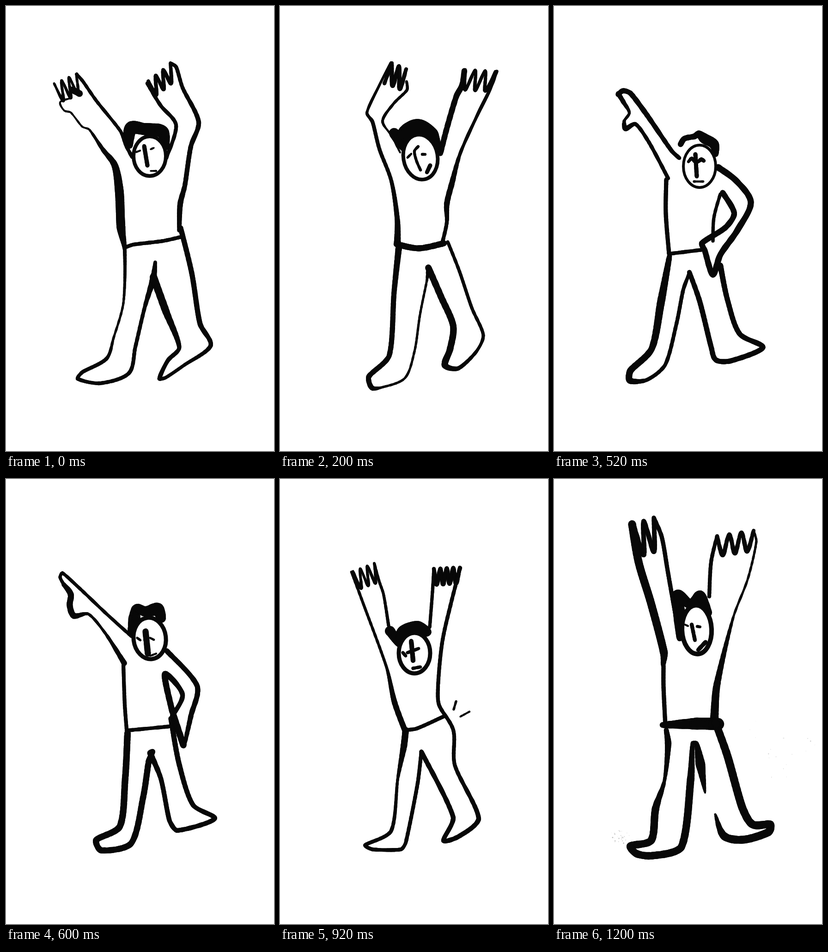
An HTML page with a canvas that plays this animation: 580x966 px, repeating every 1400 ms.

```html
<!DOCTYPE html>
<html lang="en">
<head>
<meta charset="utf-8">
<title>Brush dancer</title>
<style>
html, body { margin: 0; width: 100%; height: 100%; overflow: hidden; background: #fff; }
canvas { display: block; width: 580px; height: 966px; }
</style>
</head>
<body>
<canvas id="stage"></canvas>
<script>
const W = 580, H = 966, HOLD = 200, INK = "#080808";
const canvas = document.getElementById("stage");
const ctx = canvas.getContext("2d");
const scale = Math.max(1, window.devicePixelRatio || 1);
canvas.width = W * scale;
canvas.height = H * scale;
ctx.scale(scale, scale);

const mix = (a, b, t) => a + (b - a) * t;
const dist = (p, q) => Math.hypot(p[0] - q[0], p[1] - q[1]);

// Catmull-Rom blend of one coordinate
const blend = (a, b, c, d, t) => 0.5 * (2 * b + (c - a) * t
  + (2 * a - 5 * b + 4 * c - d) * t * t + (3 * b - a - 3 * c + d) * t * t * t);

// Pull a neighbour closer so long spans do not bend short ones.
function near(p, q, span) {
  const k = Math.min(1, span / (dist(p, q) || 1));
  return [mix(q[0], p[0], k), mix(q[1], p[1], k)];
}

// Pressure-sensitive brush line with a slightly rough edge
function sweep(pts) {
  const end = pts.length - 1;
  let [px, py] = pts[0];
  for (let i = 0; i < end; i++) {
    const b = pts[i], c = pts[i + 1], span = dist(b, c);
    const a = near(pts[Math.max(0, i - 1)], b, span);
    const d = near(pts[Math.min(end, i + 2)], c, span);
    const steps = Math.max(2, Math.ceil(span / 3));
    for (let s = 1; s <= steps; s++) {
      const t = s / steps;
      const x = blend(a[0], b[0], c[0], d[0], t);
      const y = blend(a[1], b[1], c[1], d[1], t);
      ctx.lineWidth = mix(b[2], c[2], t) + 0.5 * Math.sin(x * 1.7 + y * 0.9);
      ctx.beginPath();
      ctx.moveTo(px, py);
      ctx.lineTo(x, y);
      ctx.stroke();
      [px, py] = [x, y];
    }
  }
}

// Points are "x,y" or "x,y,width"; a missing width keeps the last one.
function line(width, text) {
  sweep(text.split(" ").map(item => {
    const [x, y, w] = item.split(",").map(Number);
    width = w || width;
    return [x, y, width];
  }));
}

// Fingers zigzag between tips on a line and valleys shifted by (dx, dy).
function fingers(n, ax, ay, bx, by, dx, dy, w) {
  const pts = [];
  for (let i = 0; i <= 2 * n - 2; i++) {
    const t = i / (2 * n - 2), low = i % 2;
    pts.push([mix(ax, bx, t) + low * dx, mix(ay, by, t) + low * dy, w - 1 + low * 2]);
  }
  sweep(pts);
}

function head(x, y, rx, ry, tilt, w) {
  ctx.beginPath();
  ctx.ellipse(x, y, rx, ry, tilt, 0, 7);
  ctx.lineWidth = w;
  ctx.fillStyle = "#fff";
  ctx.fill();
  ctx.stroke();
}

function dust(x, y, spread, count, seed) {
  const rnd = () => (seed = seed * 16807 % 2147483647) / 2147483647;
  for (let i = 0; i < count; i++) {
    ctx.fillStyle = `rgba(0,0,0,${0.06 + rnd() * 0.2})`;
    ctx.beginPath();
    ctx.arc(x + (rnd() + rnd() - 1) * spread, y + (rnd() + rnd() - 1) * spread, 0.5 + rnd(), 0, 7);
    ctx.fill();
  }
}

function reach() {
  line(18, "268,304,10 266,282,24 272,264,28 298,267,26 338,273,28 346,306,14");
  head(311, 326, 35, 43, 0, 8);
  line(9, "299,304 306,346");
  line(4, "282,317 290,314");
  line(4, "313,311 320,308");
  line(4, "313,358 325,358");
  fingers(4, 104, 168, 152, 148, 12, 41, 6);
  line(10, "153,148,7 166,163 195,205 248,272 260,303,8 273,328");
  line(9, "144,182,15 159,190,14");
  line(6, "140,200,4 117,209 126,227 140,231 165,262 180,268 210,312,9 235,345,14 245,400,19 249,482 257,530,8 254,645,5 233,720 218,765,8 165,795 155,809 203,819,8 266,797 280,740 300,655 319,590,14 323,556,7");
  line(11, "319,588,16 345,660 375,742,9 350,770 332,809 345,807,7 385,780 443,737,9 420,690,11 402,580 378,482");
  line(13, "258,524,8 275,518 340,510 380,501");
  fingers(4, 308, 163, 356, 126, 9, 36, 8);
  line(8, "356,124 368,132 382,177 417,252,10 400,305 387,390 377,430,12 375,487,9");
  line(8, "306,168 334,215 368,258 347,330");
}

function sway() {
  line(24, "247,276 266,310,8 268,278,28 298,266,42 326,280,34 338,305,18");
  head(304, 328, 37, 49, -0.16, 8);
  line(8, "299,305,6 291,315 295,335 304,356");
  line(5, "276,329 284,321");
  line(6, "308,322 314,322");
  line(9, "318,361 325,346");
  fingers(3, 242, 124, 273, 137, -6, 46, 9);
  line(12, "226,168,8 242,125");
  line(6, "240,123 215,172 188,232 200,251,8 215,310 241,380 254,465,11 254,516,15");
  line(8, "274,164,6 275,182 245,213 222,250 240,280,4 260,318");
  fingers(4, 401, 138, 466, 142, -11, 43, 7);
  line(6, "399,141,12 394,172,12 382,195 362,262 347,320");
  line(10, "469,142,7 455,180 428,235 390,320 372,385,12 361,430 361,470,8 350,519");
  line(9, "252,517,13 300,526 355,515");
  line(7, "257,525,14 247,620,11 236,760,11 192,805 199,829 220,828,5 270,808 291,750 303,670,5 318,595 321,570,10");
  line(11, "321,568,14 348,630 375,695 368,745 357,780 385,787,9 425,750,7 440,715 415,655 388,575 363,512");
}

function point() {
  line(18, "274,300,12 282,288 304,283 313,278,14 326,288,22 346,300,22 350,322,12");
  head(315, 348, 35, 46, 0, 6);
  line(9, "306,322 309,370");
  line(5, "291,338 298,331,8 304,337");
  line(6, "312,338 319,333,9 324,336");
  line(5, "303,381 323,381");
  line(11, "139,192 149,184 165,189 200,235 255,315,9 271,330");
  line(10, "139,190 150,208 163,232,6 152,250 155,266,12 176,256,8 205,295 247,374");
  line(14, "243,376,9 242,450 249,538");
  line(8, "249,538 322,529");
  line(11, "250,543 232,640,17 211,745,14 165,792 164,813 200,812,8 240,780 265,690 280,615 293,580");
  line(8, "293,578,10 315,640,11 340,740 350,768 380,771 452,741 402,712 376,640 360,563,12");
  line(10, "355,350,14 395,380,13 426,426 398,485 360,540 344,583 326,530,12 320,515 372,480 390,450 365,405");
  line(7, "360,408 346,460 344,510");
}

function jab() {
  line(18, "270,335,12 278,302,26 282,280,16 302,288,22 328,283,28 336,302,20");
  head(311, 346, 35, 45, -0.12, 9);
  line(13, "302,331 307,379");
  line(5, "284,345 291,350");
  line(5, "312,345 320,349");
  line(4, "312,384 325,379");
  line(11, "125,229,7 117,213 122,204 160,238 220,295 272,342");
  line(9, "125,229 140,250,13 138,275 147,297 178,293,6 215,335 256,400,12");
  line(12, "254,402,8 257,490 261,543");
  line(8, "261,546 355,537");
  line(9, "263,552,14 258,650 246,755 195,784,13 205,806 270,792 297,690 309,613 317,592,12 312,594");
  line(13, "312,595 335,650,10 354,742 370,763,10 452,737 405,708 375,620,11 357,520");
  line(11, "348,373 414,450 400,515 386,578,8");
  line(8, "362,512,14 384,578");
  line(10, "360,514 382,468 344,423,13 360,506");
}

function stretch() {
  line(20, "238,330,22 262,358,18 270,335,36 298,324,32 318,332,20");
  head(291, 378, 34, 44, 0, 9);
  line(10, "284,352 288,394");
  line(7, "266,377 272,384");
  line(7, "276,377 300,368");
  line(7, "288,411 304,408");
  fingers(4, 158, 200, 204, 183, 10, 40, 6);
  line(6, "155,202 180,270 231,410 248,485,12 270,545");
  line(6, "204,183 214,220 224,250 235,318,7");
  fingers(5, 333, 195, 389, 192, -1, 34, 9);
  line(7, "324,322 330,245 333,195");
  line(8, "390,193 370,270 351,355 342,450 344,490 375,545 378,620 430,738,10 385,777 354,785 375,735,10 306,592");
  line(8, "306,592 298,660 272,790 262,804 200,804 184,795 240,765 255,650,6 268,580,14 272,545");
  line(8, "270,545 295,542 353,516");
  line(5, "376,500 381,483");
  line(4, "390,516 410,505");
}

// Spiky fringe: short strokes rising from the hairline
function spikes(n, ax, ay, bx, by) {
  for (let i = 0; i < n; i++) {
    const x = mix(ax, bx, i / (n - 1)), y = mix(ay, by, i / (n - 1));
    line(7, `${x - 4},${y + 12} ${x},${y},3`);
  }
}

function lift() {
  spikes(5, 230, 325, 270, 322);
  line(20, "226,342 234,366,10 244,338 272,344 292,354");
  head(266, 390, 31, 47, -0.08, 7);
  line(6, "257,370 260,395 265,414 275,415");
  line(5, "240,383 260,375");
  line(7, "262,381 272,382");
  line(5, "275,425 284,421");
  fingers(4, 131, 209, 179, 204, 9, 36, 7);
  line(6, "129,212 152,268 180,335 212,432 225,490 218,555");
  line(7, "180,203 200,250 204,285 221,345");
  fingers(4, 289, 212, 348, 213, -4, 46, 7);
  line(6, "291,338 287,260 289,212");
  line(7, "349,212 335,290 325,340 317,430 319,562,9");
  line(9, "216,563 260,556 318,557");
  line(7, "214,563 211,580 236,632");
  line(8, "231,636,17 235,785,17 245,800 300,790 318,780 285,765,13 275,700 275,640 283,592");
  line(10, "283,588 342,675 375,766 400,766 467,724 412,740 375,670 319,562");
  line(3, "578,960 578,966");
}

function cheer() {
  line(18, "272,346,12 272,302,26 268,253,26 296,272,20 316,253,22 332,290,20");
  head(309, 327, 32, 53, -0.04, 10);
  line(9, "312,371 328,354");
  line(8, "298,316 305,350");
  line(4, "283,316 290,319");
  line(6, "310,320 316,321");
  fingers(3, 172, 98, 216, 84, 11, 70, 10);
  line(12, "169,98,17 183,180 210,270 238,378 236,405,9");
  line(9, "216,84 233,125 247,205 262,290 272,345");
  fingers(4, 353, 124, 432, 112, -1, 43, 9);
  line(8, "336,255 340,180 353,124");
  line(12, "432,112,5 438,135 420,215 388,300 352,450,15 347,520,18");
  line(15, "237,405,9 237,450 241,535");
  line(12, "235,534 311,531,26 355,532");
  line(10, "243,545 247,575,14 239,655,7 220,715,16 210,785 165,797 178,813 210,818 275,800 296,650 300,573,8 308,573 317,620,21 327,681,4");
  line(12, "349,728,4 368,775,17 410,783 465,766 468,750 430,750 408,715 375,600 350,530,16");
  dust(142, 778, 26, 30, 7);
  dust(490, 590, 90, 18, 43);
}

const poses = [reach, sway, point, jab, stretch, lift, cheer];
let shown = -1;

function tick() {
  const index = Math.floor(performance.now() / HOLD) % poses.length;
  if (index !== shown) {
    shown = index;
    ctx.clearRect(0, 0, W, H);
    ctx.strokeStyle = INK;
    ctx.lineCap = ctx.lineJoin = "round";
    poses[index]();
  }
  requestAnimationFrame(tick);
}
tick();
</script>
</body>
</html>
```
